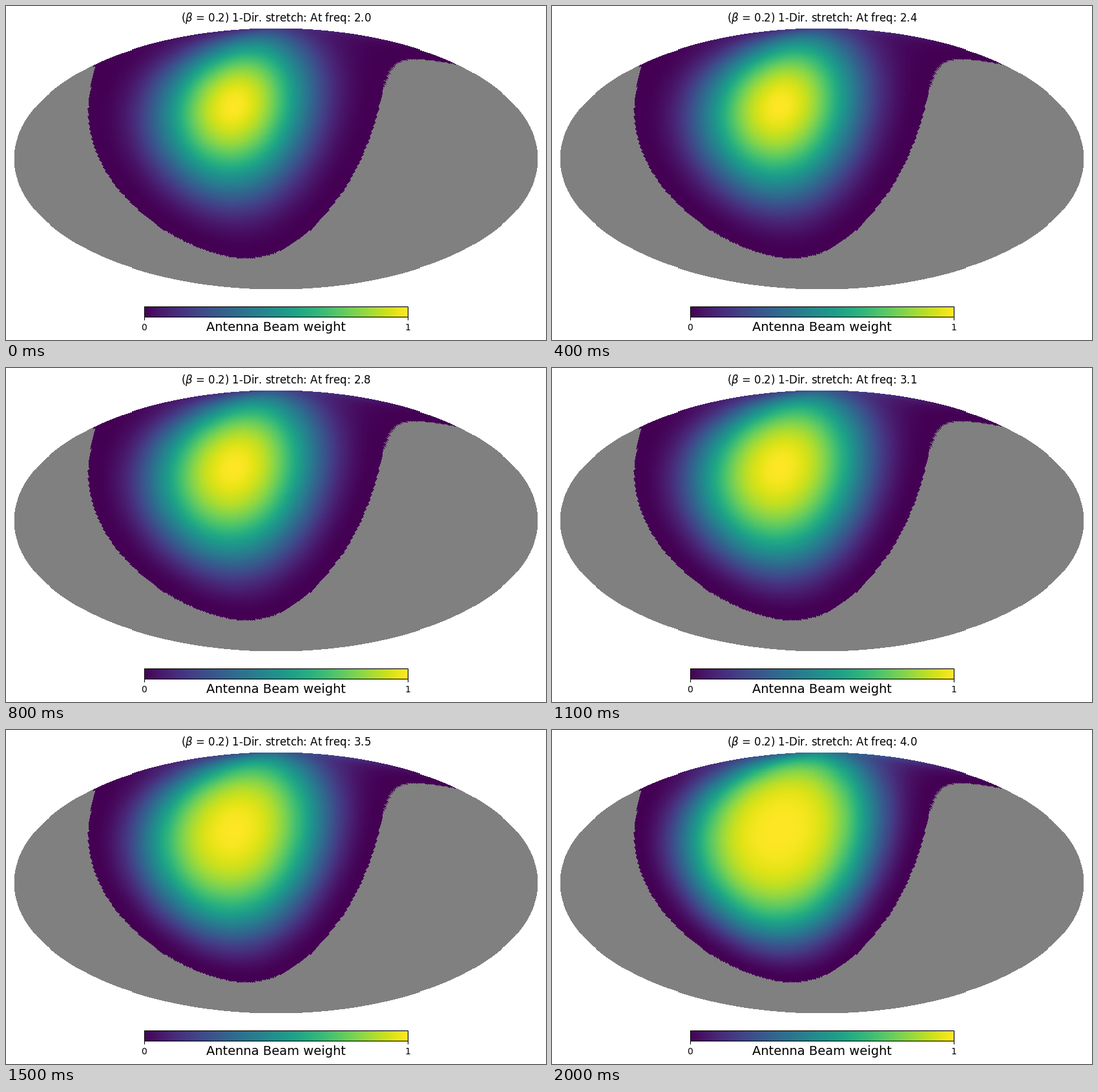
Recreate the animation shown at these times as a matplotlib script. Size 836 by 518 pixels, loop 2100 ms.

```python
import numpy as np
import matplotlib.pyplot as plt
from matplotlib.animation import FuncAnimation
from matplotlib.cm import ScalarMappable
from matplotlib.colors import Normalize

W, H, DPI = 836, 518, 100
FRAMES, INTERVAL = 21, 100
NSIDE = 64
LON0, LAT0 = np.radians([31.6, 30.0])


def snap_to_cells(lon, z):
    """Move sky positions to the centres of equal-area diamond cells."""
    quarter = np.pi / 2
    mid = (np.floor(lon / quarter) + 0.5) * quarter
    sigma = np.sqrt(3 * (1 - np.abs(z)))
    polar = np.abs(z) > 2 / 3
    x = np.where(polar, mid + (lon - mid) * sigma, lon)
    y = np.where(polar, np.sign(z) * np.pi / 4 * (2 - sigma), 3 * np.pi / 8 * z)

    step = quarter / NSIDE
    u = (np.floor((x + y) / step) + 0.5) * step
    v = (np.floor((x - y) / step) + 0.5) * step
    x, y = (u + v) / 2, (u - v) / 2

    polar = np.abs(y) > np.pi / 4 + 1e-9
    sigma = np.where(polar, np.maximum(2 - 4 * np.abs(y) / np.pi, 1e-6), 1)
    lon = np.where(polar, mid + (x - mid) / sigma, x)
    z = np.where(polar, np.sign(y) * (1 - sigma**2 / 3), 8 * y / (3 * np.pi))
    return lon, z


def sky_grid(cols=800, rows=400):
    """Cosine of the angle to the beam axis on a Mollweide grid."""
    x, y = np.meshgrid(np.linspace(-2, 2, cols), np.linspace(1, -1, rows))
    outside = x**2 / 4 + y**2 > 1
    theta = np.arcsin(np.where(outside, 0, y))
    z = (2 * theta + np.sin(2 * theta)) / np.pi
    lon = np.where(outside, 0, -np.pi * x / (2 * np.cos(theta)))
    lon, z = snap_to_cells(lon, z)
    cos_lat = np.sqrt(1 - z**2)
    mu = np.sin(LAT0) * z + np.cos(LAT0) * cos_lat * np.cos(lon - LON0)
    return mu, outside


MU, OUTSIDE = sky_grid()
UP = np.clip(MU, 0, 1)


def beam(freq):
    """Beam weight: nan below the horizon, negative off the map."""
    a = np.pi / 8 * freq
    taper = 0.85 - 0.265 * (freq - 2)
    b = (np.sin(a * UP) / np.sin(a)) ** 2 * UP**taper
    b[MU < 0] = np.nan
    b[OUTSIDE] = -1
    return b


def title_for(freq):
    return rf"($\beta$ = 0.2) 1-Dir. stretch: At freq: {freq:.1f}"


fig = plt.figure(figsize=(W / DPI, H / DPI), dpi=DPI, facecolor="white")
cmap = plt.get_cmap("viridis").with_extremes(bad="gray", under="white")
norm = Normalize(0, 1)

ax = fig.add_axes([0, 0, 1, 1])
sky = ax.imshow(beam(2.0), cmap=cmap, norm=norm, interpolation="nearest",
                extent=(12.03, 823.97, 440, 34), aspect="auto")
ax.set(xlim=(0, W), ylim=(H, 0))
ax.axis("off")
title = fig.text(0.5, 1 - 24 / H, title_for(2.0), fontsize=12,
                 ha="center", va="baseline")

cax = fig.add_axes([214 / W, 1 - 482.1 / H, 408 / W, 16.3 / H])
bar = fig.colorbar(ScalarMappable(norm, plt.get_cmap("viridis")), cax=cax,
                   orientation="horizontal", ticks=[0, 1], format="%g")
bar.solids.set_edgecolor("face")
cax.text(0.5, -1, "Antenna Beam weight", fontsize=14,
         transform=cax.transAxes, ha="center", va="center")


def update(i):
    freq = 2 + 0.1 * i
    sky.set_data(beam(freq))
    title.set_text(title_for(freq))
    return sky, title


anim = FuncAnimation(fig, update, frames=FRAMES, interval=INTERVAL,
                     repeat=True, repeat_delay=0, blit=False)
plt.show()
```
